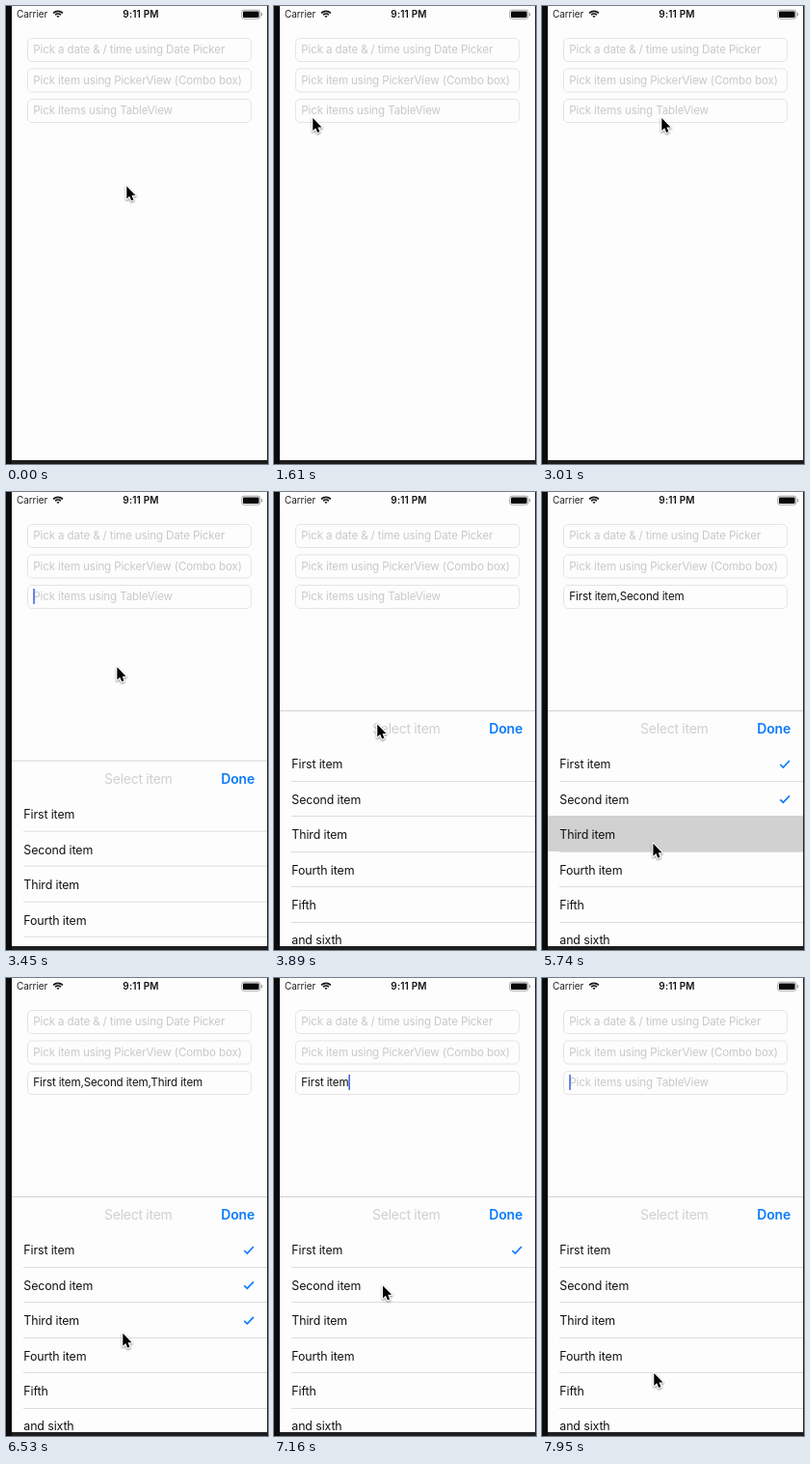
Write an HTML page with a canvas that moves like this. It is 272x474 px and loops after 8 s.

```html
<!DOCTYPE html>
<html lang="en">
<head>
<meta charset="utf-8">
<title>Item picker</title>
<style>
  html, body { margin: 0; width: 100%; height: 100%; overflow: hidden; background: #0b0b0c; }
  canvas { display: block; width: 272px; height: 474px; }
</style>
</head>
<body>
<canvas id="stage"></canvas>
<script>
const LOOP = 8000, FOCUS = 3280, PRESS = 90;
const BLUE = '#0b7bfb', ROW = 36.4, LIST_TOP = 263;
const canvas = document.getElementById('stage');
const ctx = canvas.getContext('2d');
const ratio = window.devicePixelRatio || 1;
canvas.width = 272 * ratio;
canvas.height = 474 * ratio;

const hints = [
  'Pick a date & / time using Date Picker',
  'Pick item using PickerView (Combo box)',
  'Pick items using TableView'
];
const items = ['First item', 'Second item', 'Third item', 'Fourth item', 'Fifth', 'and sixth'];

// Each tap toggles a row: time, row
const taps = [[4620, 0], [5130, 1], [5730, 2], [6570, 2], [6980, 1], [7430, 0]];

// Pointer glides: start time and goal; between taps it follows the rows with a slight sway
const home = [124.5, 185.5];
const glides = [
  [720, 88.5, 114.5], [1160, 39.5, 115], [1790, 149.5, 117], [2570, 123.5, 115], [FOCUS, 106.5, 239.5]
];
let start = 4070;
taps.forEach(([at, row], i) => {
  const sway = Math.sin(i * Math.PI / 6) ** 2;
  glides.push([start, 97 + 23.5 * sway, LIST_TOP + row * ROW + 15 + 16 * sway]);
  start = at + PRESS;
});
glides.push([start, 115.5, 408]);

const clamp = v => Math.max(0, Math.min(1, v));
const smooth = v => v * v * (3 - 2 * v);

function pointerAt(t) {
  let [x, y] = home;
  for (const [begin, goalX, goalY] of glides) {
    const k = smooth(clamp((t - begin) / (280 + 3 * Math.abs(goalX - x))));
    x += (goalX - x) * k;
    y += (goalY - y) * k;
  }
  return [x, y];
}

function stateAt(t) {
  const done = taps.filter(([at]) => at + PRESS <= t);
  const checked = items.map((_, row) => done.filter(tap => tap[1] === row).length % 2 === 1);
  const value = items.filter((_, row) => checked[row]).join(',');
  const changed = done.length ? done.at(-1)[0] + PRESS : FOCUS;
  const press = taps.find(([at]) => at <= t && t < at + PRESS);
  return {
    checked, value,
    caret: t >= FOCUS && (t - changed) % 1000 < 500,
    pressed: press && value ? press[1] : -1
  };
}

function rect(x, y, w, h, color) {
  ctx.fillStyle = color;
  ctx.fillRect(x, y, w, h);
}

function text(str, x, y, size, color, spacing = 0, weight = 400, align = 'left') {
  ctx.font = `${weight} ${size}px Inter, "Liberation Sans", sans-serif`;
  ctx.letterSpacing = spacing + 'px';
  ctx.textAlign = align;
  ctx.fillStyle = color;
  ctx.fillText(str, x, y);
  return ctx.measureText(str).width;
}

function box(x, y, w, h, r) {
  ctx.beginPath();
  ctx.roundRect(x, y, w, h, r);
}

function drawStatus() {
  text('Carrier', 11, 12, 10, '#222', -0.08);
  text('9:11 PM', 140, 12, 10, '#111', 0.15, 600, 'center');
  ctx.strokeStyle = '#111';
  ctx.lineWidth = 1.7;
  for (let r = 1.4; r < 7; r += 2.75) {
    ctx.beginPath();
    ctx.arc(54, 12.2, r, -Math.PI * 0.75, -Math.PI * 0.25);
    ctx.stroke();
  }
  ctx.strokeStyle = '#999';
  ctx.lineWidth = 0.9;
  box(244.7, 4.2, 19.2, 9, 2.4);
  ctx.stroke();
  ctx.fillStyle = '#080808';
  box(246, 5.4, 16.6, 6.6, 1.2);
  ctx.fill();
  rect(264.9, 7.2, 1.2, 3, '#999');
}

function drawFields({ value, caret }) {
  hints.forEach((hint, i) => {
    const y = 33.5 + i * 31.5;
    const shown = i === 2 ? value : '';
    ctx.strokeStyle = '#e5e5e5';
    ctx.lineWidth = 1;
    box(22.5, y, 232, 24, 4.5);
    ctx.stroke();
    const width = text(shown || hint, 28.3, Math.floor(y + 16), 11.6, shown ? '#111' : '#c9c9cc', -0.14);
    if (i === 2 && caret) rect(28.2 + (shown && width), 100, 1.6, 16, '#4a6be0');
  });
}

function drawCheck(y) {
  ctx.strokeStyle = BLUE;
  ctx.lineWidth = 1.7;
  ctx.beginPath();
  ctx.moveTo(247.3, y + 19);
  ctx.lineTo(250.4, y + 22);
  ctx.lineTo(257, y + 15);
  ctx.stroke();
}

function drawPanel(t, { checked, pressed }) {
  const hidden = Math.pow(1 - clamp((t - FOCUS) / 420), 3);
  ctx.save();
  ctx.translate(0, hidden * 248);
  rect(6, 226, 265, 248, '#fdfdfd');
  rect(6, 226, 265, 1, '#d2d2d2');
  text('Select item', 137.3, 250, 14, '#d0d0d2', -0.28, 400, 'center');
  text('Done', 258, 250, 14, BLUE, -0.2, 600, 'right');
  items.forEach((name, i) => {
    const y = LIST_TOP + i * ROW;
    rect(18, Math.floor(y + ROW), 253, 1, '#dcdcdc');
    if (i === pressed) rect(6, Math.floor(y), 265, 37, '#d1d1d1');
    text(name, 18.3, Math.round(y + 23.3), 12.4, '#111', -0.11);
    if (checked[i]) drawCheck(y);
  });
  ctx.restore();
}

function drawPointer(t) {
  const arrow = new Path2D('M.8 1V14L3.7 11.3L5.7 15.9L7.9 15L6 10.4H10Z');
  ctx.save();
  ctx.translate(...pointerAt(t));
  ctx.lineJoin = 'round';
  ctx.lineWidth = 2.4;
  ctx.strokeStyle = '#fff';
  ctx.shadowColor = 'rgba(0,0,0,.45)';
  ctx.shadowBlur = 2 * ratio;
  ctx.shadowOffsetY = ratio;
  ctx.stroke(arrow);
  ctx.shadowColor = 'transparent';
  ctx.fillStyle = '#000';
  ctx.fill(arrow);
  ctx.restore();
}

function draw(t) {
  const state = stateAt(t);
  ctx.setTransform(ratio, 0, 0, ratio, 0, 0);
  rect(0, 0, 272, 474, '#0b0b0c');
  rect(6, 470, 266, 4, '#1d1d1f');
  rect(271, 0, 1, 470, '#2a2a2c');
  ctx.save();
  ctx.beginPath();
  ctx.rect(6, 0, 265, 470);
  ctx.clip();
  rect(6, 0, 265, 470, '#fdfdfd');
  drawStatus();
  drawFields(state);
  drawPanel(t, state);
  drawPointer(t);
  ctx.restore();
}

const loaded = performance.now();
function tick() {
  draw((performance.now() - loaded) % LOOP);
  requestAnimationFrame(tick);
}
tick();
</script>
</body>
</html>
```
